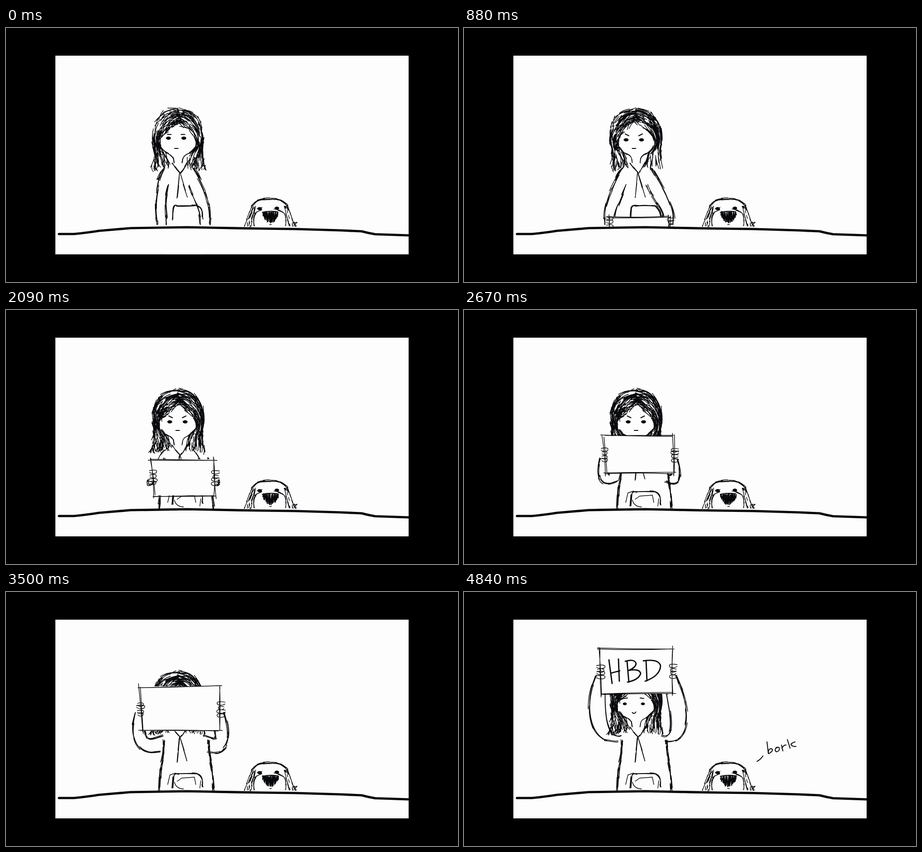
An HTML page that plays this animation: 998x561 px, repeating every 5.09 s.

```html
<!DOCTYPE html>
<html lang="en">
<head>
<meta charset="utf-8">
<title>Birthday sign</title>
<style>
html, body { margin: 0; width: 100%; height: 100%; overflow: hidden; background: #000; }
svg { display: block; width: 100%; height: 100%; }
path { fill: none; stroke: #07080b; stroke-width: 1.4; stroke-linecap: round; stroke-linejoin: round; }
.paper { fill: #fdfdfd; stroke: none; }
.ink { fill: #07080b; stroke-width: 1; }
.mid { stroke-width: 2; }
#word { stroke-width: 2.8; }
#ground { stroke-width: 5.2; }
</style>
</head>
<body>
<svg viewBox="0 0 998 561">
  <clipPath id="page"><rect x="109" y="61.1" width="780" height="438.75"/></clipPath>
  <rect class="paper" x="109" y="61.1" width="780" height="438.75"/>
  <g clip-path="url(#page)">
    <path id="hair"/>
    <path id="body"/>
    <path id="eyes" class="ink"/>
    <path id="face" class="mid"/>
    <path id="board" class="paper"/>
    <path id="edges"/>
    <path id="word"/>
    <path id="soil" class="paper"/>
    <path id="ground"/>
    <path id="dog"/>
    <path id="dogEyes" class="ink"/>
    <path id="nose" class="mid"/>
    <path id="bark" class="mid"/>
  </g>
</svg>
<script>
const LOOP = 5090, REST = 4840, STEP = 55;

// time, board centre x and y, board width and height, face centre x
const TRACK = [
  [0, 392, 480, 96, 54, 375.5],
  [420, 386, 480, 128, 54, 376.5],
  [1330, 388, 414, 138, 54, 373.5],
  [2090, 392, 372, 136, 80, 378.5],
  [2670, 386, 319, 154, 82, 379.5],
  [3500, 384, 257, 177, 98, 379],
  [3880, 381, 171, 160, 100, 375],
  [4500, 380, 175, 159, 98, 375]];

// left half of the hair; the right half mirrors it
const OUTER = [379, 175, 349, 183, 329, 207, 322, 240, 325, 266, 324, 288, 320, 312];
const FRINGE = [388, 206, 373, 215, 356, 229, 343, 244, 342, 262, 356, 278, 364, 303];
const CHIN = [343, 264, 354, 276, 368, 284, 371, 297];

const WORD = ['M320 150L327 202M341 148L343 197M325 179L344 174',
  'M360 153L364 199M356 153Q377 147 380 158Q379 167 364 173Q388 169 390 180Q386 194 361 199',
  'M402 152L404 196M396 152Q430 147 434 163Q433 185 400 197'];
const BARK = ['M647 374Q655 370 660 362',
  'M669 331L672 357Q671 346 679 346Q685 350 673 357',
  'M690 343Q684 350 690 353Q698 351 696 344Q692 341 688 346',
  'M701 338L704 351M702 345Q706 337 711 338',
  'M714 326L720 345M731 331Q722 334 722 337Q725 342 733 341'];
const GROUND = 'M117 455L150 455Q180 452 205 448L275 442L400 440L450 441L560 443L640 444L740 447L785 449Q800 453 815 455.5L889 458';

const $ = id => document.getElementById(id);
const set = (id, d) => $(id).setAttribute('d', d);
const mix = (a, b, k) => a + (b - a) * k;
const clamp = v => Math.min(Math.max(v, 0), 1);
const flip = (p, axis) => p.map((v, i) => i % 2 ? v : 2 * axis - v);
const f = v => v.toFixed(1);

function random(seed) {
  let s = (seed * 7919 + 123457) % 2147483647;
  const next = () => (s = s * 16807 % 2147483647) / 2147483647;
  next(); next();
  return next;
}

function trackAt(t) {
  let i = 0;
  while (i < TRACK.length - 2 && t >= TRACK[i + 1][0]) i++;
  const [a, b] = [TRACK[i], TRACK[i + 1]];
  const k = clamp((t - a[0]) / (b[0] - a[0]));
  return a.map((v, j) => mix(v, b[j], k)).slice(1);
}

// Catmull-Rom position along a flat list of points
function along(p, u) {
  const n = p.length / 2 - 1, x = clamp(u) * n;
  const i = Math.min(Math.floor(x), n - 1), k = x - i;
  return [0, 1].map(c => {
    const [a, b, d, e] = [i - 1, i, i + 1, i + 2].map(j => p[2 * Math.min(Math.max(j, 0), n) + c]);
    return b + k / 2 * (d - a + k * (2 * a - 5 * b + 4 * d - e + k * (3 * (b - d) + e - a)));
  });
}

// points sampled from a cubic Bezier
function bezier(a, b, c, d) {
  return Array.from({ length: 8 }, (_, i) => {
    const k = i / 7, q = 1 - k;
    return [0, 1].map(j => q * q * q * a[j] + 3 * q * q * k * b[j] + 3 * q * k * k * c[j] + k * k * k * d[j]);
  }).flat();
}

function curve(a, m, b) {
  const c = [0, 1].map(i => 2 * m[i] - (a[i] + b[i]) / 2);
  return `M${f(a[0])} ${f(a[1])}Q${f(c[0])} ${f(c[1])} ${f(b[0])} ${f(b[1])}`;
}

// overlapping short pen strokes that follow a line
function rough(p, r, passes = 1, amp = 0.7, len = 0.5) {
  let d = '';
  for (let i = 0; i < passes; i++)
    for (let u = -r() * len * 0.4 * (passes > 1); u < 0.97; u += len * 0.9) {
      const dx = (r() - 0.5) * 2 * amp, dy = (r() - 0.5) * 2 * amp, lean = (r() - 0.5) * amp;
      const at = (v, k) => along(p, v).map((c, j) => c + (j ? dy : dx + k * lean));
      d += curve(at(u, -1), at(u + len / 2, 0), at(u + len, 1));
    }
  return d;
}

// loose strokes that fill the band between two lines
function strands(outer, inner, r, n) {
  let d = '';
  for (let i = 0; i < n; i++) {
    const u = r() ** 1.25 - 0.05, len = 0.09 + r() * 0.13, v = r(), slip = (r() - 0.5) * 0.2;
    const at = (w, k) => {
      const a = along(outer, w), b = along(inner, w), q = v + slip * k;
      return [mix(a[0], b[0], q), mix(a[1], b[1], q)];
    };
    const end = at(u + len, 1), over = Math.max(0, u + len - 1) * 50;
    d += curve(at(u, -1), at(u + len / 2, 0), [end[0] + slip * 15, end[1] + over]);
  }
  return d;
}

// side is -1 for the left arm and 1 for the right one
function arm(side, cx, handY, w, up, r) {
  const reach = clamp((420 - handY) / 240), axis = mix(381, 392, up);
  const hand = cx + side * w / 2;
  const point = (p, dx, dy) => [p[0] + side * dx, p[1] + dy];
  const shoulder = [axis + side * mix(33, 52, up), mix(311, 330 + Math.max(0, handY - 200) * 0.4, up)];
  const wrist = [hand + side * 9, handY + mix(0, 10, up)];
  const sleeve = bezier(shoulder, point(shoulder, mix(15, 65 * reach, up), mix(23, 14, up)),
    point(wrist, mix(8, 30 * reach, up), mix(-35, 55, up)), wrist);
  const pit = [axis + side * mix(23, 46, up), mix(347, 317, up)];
  const palm = [hand - side * 12, handY + mix(0, 32, up)];
  const inside = bezier(pit, point(pit, mix(8, 35, up), mix(30, 12, up)),
    point(palm, 2, mix(-35, 40, up)), palm);
  return rough(sleeve, r, 3, 2.2, 0.26) + rough(inside, r, 3, 2, 0.33);
}

function boardEdges(p, r) {
  let d = '';
  const n = () => (r() - 0.5) * 6;
  for (let i = 0; i < 8; i++) {
    const at = j => [p[j % 4 * 2], p[j % 4 * 2 + 1]];
    const [ax, ay] = at(i), [bx, by] = at(i + 1), s = 1 / Math.hypot(bx - ax, by - ay);
    const from = (4 - r() * 12) * s, to = 1 + (r() * 12 - 4) * s;
    d += `M${f(mix(ax, bx, from) + n())} ${f(mix(ay, by, from) + n())}` +
      `Q${f((ax + bx) / 2 + n())} ${f((ay + by) / 2 + n())} ${f(mix(ax, bx, to) + n())} ${f(mix(ay, by, to) + n())}`;
  }
  return d;
}

function fingers(x, y, side, r) {
  let d = '';
  for (let i = 0; i < 4; i++) {
    const h = y - 15 + i * 8 + r() * 4, w = side * (5 + r() * 4);
    d += `M${f(x - w)} ${f(h)}Q${f(x + w * 1.6)} ${f(h - 4)} ${f(x + w)} ${f(h + 5)}Q${f(x)} ${f(h + 9)} ${f(x - w)} ${f(h + 4)}`;
  }
  return d;
}

const blob = (x, y, w, h) => `M${f(x - w)} ${f(y)}a${f(w)} ${f(h)} 0 1 0 ${f(2 * w)} 0a${f(w)} ${f(h)} 0 1 0 ${f(-2 * w)} 0`;

function drawDog() {
  const r = random(5), axis = 582.5;
  const ear = [543, 391, 535, 415, 526, 438], lock = [551, 394, 546, 415, 540, 438];
  const cheek = [565, 402, 551, 409, 547, 422, 548, 437];
  let d = rough([543, 391, 558, 380, 583, 377, 607, 380, 622, 392], r, 3, 2.2, 0.15);
  for (const side of [p => p, p => flip(p, axis)])
    d += strands(side(ear), side(lock), r, 20) + rough(side(ear), r, 1, 1, 0.35) +
      rough(side(lock), r, 1, 1, 0.4) + rough(side(cheek), r, 2, 1, 0.4);
  set('dog', d + 'M632 431L643 429L636 436M636 428L641 438M582 434L586 434');
  set('dogEyes', blob(560, 399, 4.5, 3) + blob(598, 398, 4.5, 3) + 'M554 399L566 396M591 400L604 402');
}

function nose(r) {
  let d = 'M566 407Q583 403 600 406';
  for (let i = 0; i < 17; i++) {
    const x = 566 + i * 2.1, low = 431 - 16 * ((x - 583) / 17) ** 2;
    d += `${i ? 'L' : 'M'}${f(x + r() * 2)} ${f(405 + r() * 3)}L${f(x + r() * 2)} ${f(low - r() * 3)}`;
  }
  return d;
}

function drawBody(r, up) {
  let d = rough(CHIN, r, 2) + rough(flip(CHIN, 380), r, 2);
  d += rough([367, 298, 376, 311, 385, 321], r, 2, 1) + rough([400, 297, 393, 310, 385, 321], r, 2, 1);
  d += rough([383, 321, 378, 374], r, 2, 0.8, 0.7) + rough([385, 323, 400, 373], r, 2, 0.8, 0.7);
  const lift = mix(-9, 0, up), pocket = [368, 432, 370, 404, 384, 402, 426, 403, 434, 430];
  d += rough(pocket.map((v, i) => i % 2 ? v + lift : v), r, 3, 1.3, 0.28);
  if (up < 0.9) {
    const slope = [350, 309, 341, 320, 334, 335];
    d += rough(slope, r, 2, 1.2) + rough(flip(slope, 382), r, 2, 1.2);
  }
  if (up > 0.3) {
    const flank = [349, 328, 346, 363, 341, 400, 338, 438];
    d += rough(flank, r, 5, 2.2, 0.17) + rough(flip(flank, 398), r, 5, 2.2, 0.17);
    d += 'M357 425L362 404L374 400M378 418L388 411L416 409L419 425M372 420Q375 434 392 435M430 417L428 433';
  }
  return d;
}

function drawFace(x, t) {
  const smile = clamp((t - 3500) / 380), stern = clamp(t / 400) - 1.3 * smile;
  const gap = mix(17, 20, smile), y = mix(243, 247, clamp(t / 400)), size = mix(5, 4, smile);
  set('eyes', blob(x - gap, y, size, size * 0.62) + blob(x + gap, y, size, size * 0.62));
  let d = `M${f(x - 3.5)} 266Q${f(x + 1)} ${f(266 + 5 * smile)} ${f(x + 4.5)} ${f(266 - smile)}`;
  for (const side of [-1, 1])
    d += `M${f(x + side * (gap + 2))} ${f(235 - stern)}L${f(x + side * (gap - 6))} ${f(235 + 3 * stern)}`;
  set('face', d);
}

function draw(time) {
  const step = Math.floor(Math.min(time, REST) / STEP), t = (step + 0.5) * STEP;
  const [cx, cy, w, h, faceX] = trackAt(t);
  const late = t > 1700, handY = Math.min(cy, 432), up = clamp((413 - handY) / 70);
  const still = random(late ? 99 : step >> 1), live = random(step + 200);

  const n = late ? 215 : 165;
  set('hair', strands(OUTER, FRINGE, still, n) + strands(flip(OUTER, 380), flip(FRINGE, 380), still, n));
  set('body', drawBody(still, up) + arm(-1, cx, handY, w, up, live) + arm(1, cx, handY, w, up, live));
  drawFace(faceX, t);

  const [l, r, top, low] = [cx - w / 2, cx + w / 2, cy - h / 2, cy + h / 2];
  const board = [l - 2, top, r, top, r + 1, low, l + 4, low];
  set('board', 'M' + board.map(f).join(' ') + 'Z');
  set('edges', boardEdges(board, live) +
    (cy < 445 ? fingers(l + 1, handY, 1, live) + fingers(r + 3, handY, -1, live) : ''));
  set('word', WORD.filter((_, i) => t >= 3990 + i * 140).join(''));
  set('bark', BARK.filter((_, i) => t >= 4560 + i * 65).join(''));
  set('nose', nose(random(step >> 1)));
}

set('ground', GROUND);
set('soil', GROUND + 'L889 500L109 500L109 455Z');
drawDog();
const start = performance.now();
function tick() {
  draw((performance.now() - start) % LOOP);
  requestAnimationFrame(tick);
}
tick();
</script>
</body>
</html>
```
